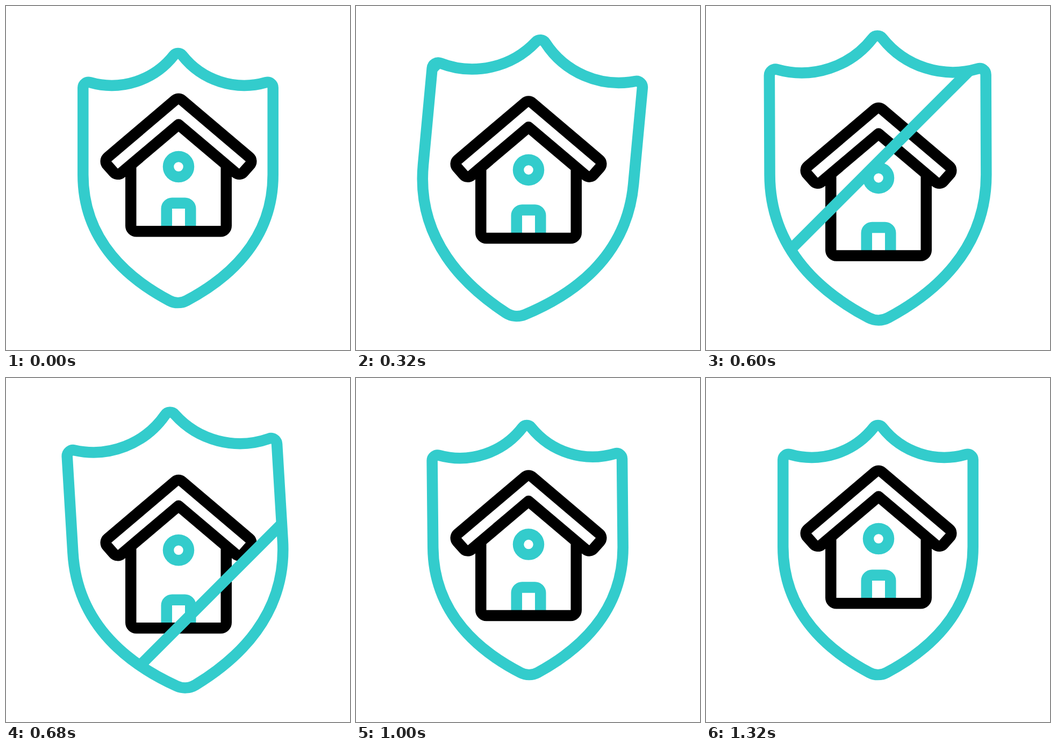
Animation of 640x640 px, one loop 1.44 s. Source, as an HTML page without scripts:

```html
<!DOCTYPE html>
<html lang="en">
<head>
<meta charset="utf-8">
<title>Home shield</title>
<style>
  html, body { margin: 0; width: 100%; height: 100%; overflow: hidden; background: #fff; }
  svg { display: block; width: 100%; height: 100%; }

  path, circle { fill: none; stroke-width: 20.5; stroke-linejoin: round; }
  .teal { stroke: #3cc; }
  .black { stroke: #000; }

  .shield {
    vector-effect: non-scaling-stroke;
    transform-origin: 320px 320px;
    animation: tilt 1440ms infinite cubic-bezier(.6, 0, .4, 1),
               swell 1440ms infinite cubic-bezier(.333, 0, .667, 1);
  }
  .shine { animation: sweep 1440ms infinite cubic-bezier(.6, 0, .4, 1); }
  .part { animation: drop 1440ms infinite cubic-bezier(.6, 0, .4, 1); }
  .base { --drop: 46px; }
  .window { --drop: 21.3px; }
  .roof { --drop: 17.3px; fill: #fff; }

  @keyframes tilt {
    0%, 4.17% { rotate: 0deg; }
    28.47% { rotate: 5.8deg; }
    52.78% { rotate: -4.05deg; }
    77.08%, 100% { rotate: 0deg; }
  }
  @keyframes swell {
    0%, 4.17% { scale: 1; }
    31.25%, 37.22% { scale: 1.15; }
    65.49%, 100% { scale: 1; }
  }
  @keyframes sweep {
    0%, 11.39% { translate: 0 0; }
    73.89%, 100% { translate: 410px 410px; }
  }
  @keyframes drop {
    0%, 5.56% { translate: 0 0; }
    47.22% { translate: 0 var(--drop); }
    91.67%, 100% { translate: 0 0; }
  }
</style>
</head>
<body>
<svg viewBox="0 0 640 640">
  <defs>
    <clipPath id="inside">
      <path class="shield" d="M143.3 152A10.2 10.2 0 0 1 156.3 142.2A147 147 0 0 0 312 91.9A10.2 10.2 0 0 1 328 91.9A147 147 0 0 0 483.7 142.2A10.2 10.2 0 0 1 496.7 152V314C496.7 440 408 510 336 548.1A34 34 0 0 1 304 548.1C232 510 143.3 440 143.3 314Z"/>
    </clipPath>
  </defs>

  <path class="shield teal" d="M143.3 152A10.2 10.2 0 0 1 156.3 142.2A147 147 0 0 0 312 91.9A10.2 10.2 0 0 1 328 91.9A147 147 0 0 0 483.7 142.2A10.2 10.2 0 0 1 496.7 152V314C496.7 440 408 510 336 548.1A34 34 0 0 1 304 548.1C232 510 143.3 440 143.3 314Z"/>

  <!-- The walls run up behind the roof, so they seem to stretch. -->
  <g class="part base">
    <path class="teal" d="M298.75 415V377a10.25 10.25 0 0 1 10.25-10.25H333a10.25 10.25 0 0 1 10.25 10.25V415"/>
    <path class="black" d="M232.25 255V409a10.25 10.25 0 0 0 10.25 10.25H399.5a10.25 10.25 0 0 0 10.25-10.25V255"/>
  </g>
  <circle class="part window teal" cx="321" cy="299" r="19"/>
  <path class="part roof black" d="M321 220.5L427.4 310.5A10.25 10.25 0 0 0 441.7 309.3L453.7 295.8A10.25 10.25 0 0 0 452.6 281.2L327.6 175.2A10.25 10.25 0 0 0 314.4 175.2L189.4 281.2A10.25 10.25 0 0 0 188.3 295.8L200.3 309.3A10.25 10.25 0 0 0 214.6 310.5Z"/>

  <g clip-path="url(#inside)">
    <path class="shine teal" d="M-285 515L515-285"/>
  </g>
</svg>
</body>
</html>
```
